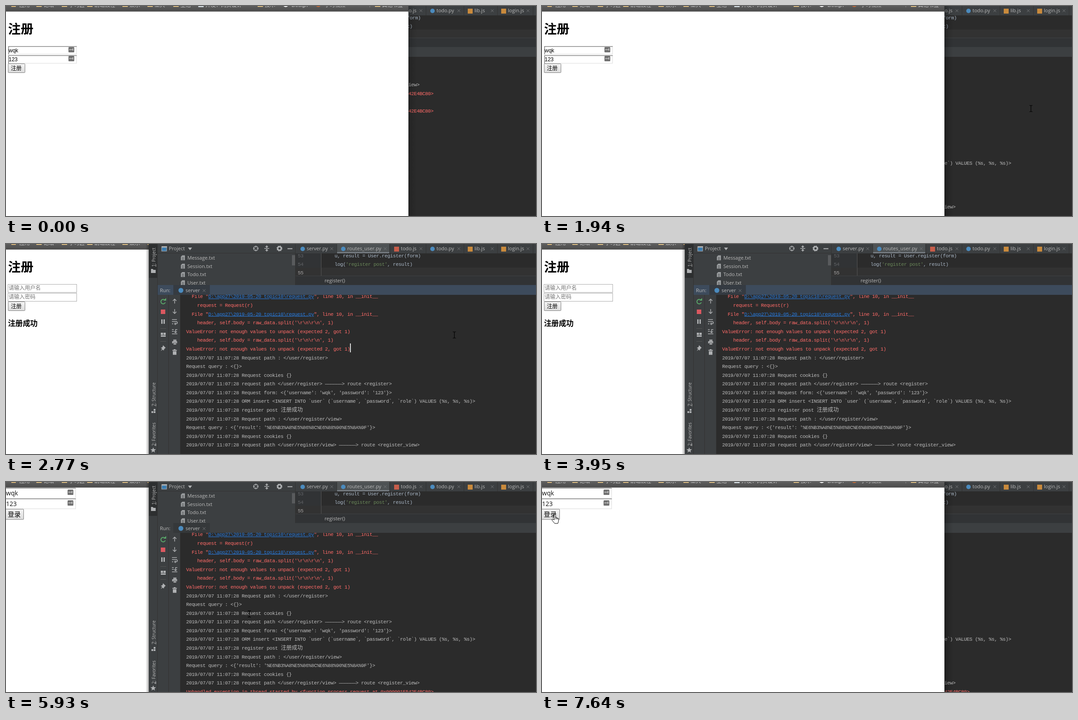
Recreate the animation shown at these times as an HTML page. Size 1188 by 471 pixels, loop 8 s.

```html
<!DOCTYPE html>
<html lang="zh">
<head>
<meta charset="utf-8">
<style>
html, body { margin: 0; width: 100%; height: 100%; overflow: hidden; background: #2b2b2b; }
svg { display: block; }
text { white-space: pre; font-family: "Open Sans", "Noto Sans CJK SC", sans-serif; }
.mono { font: 11.2px "Liberation Mono", "Noto Sans CJK SC", monospace; letter-spacing: -.486px; }
.cjk { font-family: "Liberation Sans", "Noto Sans CJK SC", sans-serif; }
.link { fill: #287bde; text-decoration: underline 1px; }
.str { fill: #6a8759; }
.u { text-decoration: underline; }
</style>
</head>
<body>
<svg id="stage" width="1188" height="471" viewBox="0 0 1188 471"></svg>
<script>
const USER = 'wqk';
const esc = s => s.replace(/&/g, '&amp;').replace(/</g, '&lt;');
const rect = (x, y, w, h, fill, more = '') =>
  `<rect x="${x}" y="${y}" width="${w}" height="${h}" fill="${fill}" ${more}/>`;
const dot = (x, y, r, fill) => `<circle cx="${x}" cy="${y}" r="${r}" fill="${fill}"/>`;
const line = (d, color = '#afb1b3', width = 1.5) =>
  `<path d="${d}" fill="none" stroke="${color}" stroke-width="${width}"/>`;
const shape = (d, fill = '#afb1b3') => `<path d="${d}" fill="${fill}"/>`;
// y is the vertical middle of the text
const text = (x, y, s, fill = '#bbb', size = 11.1, more = '') =>
  `<text x="${x}" y="${y + size * .36}" fill="${fill}" font-size="${size}" ${more}>${esc(s)}</text>`;
const cjk = (x, y, s, size, fill = '#000', more = '') => text(x, y, s, fill, size, 'class="cjk" ' + more);
const code = (x, y, s, fill = '#bbb') =>
  `<text class="mono" x="${x}" y="${y + 4}" fill="${fill}">` +
  esc(s).replace(/D:.*?py/, '<tspan class="link">$&</tspan>').replace(/'register post'/, '<tspan class="str">$&</tspan>') +
  '</text>';
const group = (id, s, more = '') => `<g id="${id}" ${more}>${s}</g>`;
const cross = (x, y) => line(`M${x - 3} ${y - 3}l6 6m0-6l-6 6`, '#77797b', 1);

// ---- console ----
const RED = '#ff6b68', stamp = '2019/07/07 11:07:28 ';
const file = '  File "D:\\app27\\2019-05-20 topic10\\request.py", line 10, in __init__';
const split = "    header, self.body = raw_data.split('\\r\\n\\r\\n', 1)";
const unpack = 'ValueError: not enough values to unpack (expected 2, got 1)';
const viewed = stamp + 'request path </user/register/view> ——————> route <register_view>';
const crash = 'Unhandled exception in thread started by <function process_request at 0x000001E542E4BC80>';
const row = (i, s, fill) => code(403.7, 117.4 + 19.59 * i, s, fill);
const errors = [file, '    request = Request(r)', file, split, unpack, split, unpack];
const logs = [
  stamp + 'Request path : </user/register>',
  'Request query : <{}>',
  stamp + 'Request cookies {}',
  stamp + 'request path </user/register> ——————> route <register>',
  stamp + `Request form: <{'username': '${USER}', 'password': '123'}>`,
  stamp + 'ORM insert <INSERT INTO `user` (`username`, `password`, `role`) VALUES (%s, %s, %s)>',
  stamp + 'register post ',
  stamp + 'Request path : </user/register/view>',
  "Request query : <{'result': '%E6%B3%A8%E5%86%8C%E6%88%90%E5%8A%9F'}>",
  stamp + 'Request cookies {}',
  viewed
];
const consoleBox = rect(391, 114, 797, 357, '#2b2b2b') + group('inner',
  group('before', row(3, viewed) + row(4, crash, RED) + row(6, crash, RED)) +
  group('after', errors.map((s, i) => row(i, s, RED)).join('') +
    logs.map((s, i) => row(i + 7, s)).join('') + cjk(616, 371.5, '注册成功', 12.3, '#bbb')) +
  group('crash', row(18, crash, RED)) +
  group('caret', rect(771, 223, 2, 20, '#ddd')), 'clip-path="url(#consoleClip)"');

// ---- editor window ----
const PY = '#4b8bbe', JS = '#c98a3c';
const tabs = [['server.py', 674, 730, PY], ['routes_user.py', 765, 850, PY], ['todo.js', 885, 930, '#c75d4a'],
  ['todo.py', 965, 1015, PY], ['lib.js', 1050, 1090, JS], ['login.js', 1125, 1170, JS]];
const tabBar = rect(649, 0, 539, 21, '#3c3f41') + rect(741, 0, 118, 21, '#4e5254') + rect(741, 18, 118, 3, '#747a80') +
  tabs.map(([name, x, end, color]) =>
    (color === PY ? dot(x - 9, 11, 5, color) : rect(x - 15, 6, 11, 11, color)) +
    text(x, 10.5, name) + cross(end, 10.5)).join('') +
  [741, 860, 941, 1026, 1101, 1181].map(x => rect(x, 0, 1, 21, '#323232')).join('');

const editor = rect(649, 20, 539, 73, '#2b2b2b') + rect(649, 20, 57, 52, '#313335') +
  rect(649, 53, 539, 18, '#323232') + rect(706, 20, 1, 52, '#555') +
  [53, 54, 55].map((n, i) => code(654, 26 + i * 19.2, '' + n, i < 2 ? '#606366' : '#a4a3a3')).join('') +
  code(736.5, 25.5, 'u, result = User.register(form)', '#a9b7c6') +
  code(736.5, 45, "log('register post', result)", '#a9b7c6') +
  rect(649, 71, 539, 22, '#313335') + rect(649, 71, 539, 1, '#3f4143') + text(714, 82, 'register()');

const tree = rect(340, 0, 309, 93, '#3c3f41') + rect(340, 20, 309, 1, '#323232') +
  rect(349, 6, 11, 10, '#3a7cb0', 'stroke="#afb1b3"') + rect(349, 5, 12, 3, '#afb1b3') +
  text(365, 10.5, 'Project') + shape('M408 8h9l-4.5 6z') +
  `<circle cx="560" cy="10" r="5" fill="none" stroke="#afb1b3" stroke-width="1.4"/>` + line('M560 4v4m0 4v4m-6-6h4m4 0h4') +
  line('M579 10h11M584.500 3v4m0 6v4', '#afb1b3', 1.6) + shape('M581 5h7l-3.500 4zM581 15h7l-3.500-4z') +
  `<circle cx="613" cy="10" r="4" fill="none" stroke="#afb1b3" stroke-width="3"/>` +
  `<circle cx="613" cy="10" r="5.500" fill="none" stroke="#afb1b3" stroke-width="2" stroke-dasharray="2.160"/>` +
  rect(631, 9.5, 11, 2, '#afb1b3') +
  ['Message', 'Session', 'Todo', 'User'].map((s, i) => {
    const y = 31 + i * 18.7;
    return shape(`M395 ${y - 5.5}h6v11h-9v-8z`, '#9da0a2') +
      line(`M394 ${y - 1}h5m-5 2.500h5m-5 2.500h5`, '#4a4d4f', 1) + text(406.5, y, s + '.txt');
  }).join('') + rect(641, 25, 7, 23, '#595b5d') + rect(648, 0, 1, 93, '#323232');

const side = (y, n, s) => `<text transform="translate(334.500 ${y}) rotate(-90)" font-size="9.900" fill="#bbb">` +
  `<tspan class="u">${n}</tspan>: ${s}</text>`;
const strip = rect(320, 0, 20, 471, '#3c3f41') + rect(320, 0, 19, 76, '#2d2f30') + rect(339, 0, 1, 471, '#323232') +
  side(51, 1, 'Project') + shape('M325 56h4l1.500 2h5v7h-10.500z') +
  side(364, 7, 'Structure') + rect(326, 375, 4, 4, '#afb1b3') + rect(331, 375, 4, 4, '#afb1b3') + rect(331, 370, 4, 4, '#afb1b3') +
  side(453, 2, 'Favorites') + shape('M330 456l1.700 4.300 4.500.200-3.500 2.900 1.300 4.400-4-2.500-4 2.500 1.300-4.400-3.500-2.900 4.500-.200z');

const runBar = rect(340, 92, 848, 22, '#3c3f41', 'id="runBar"') + rect(375, 92, 82, 22, '#323638', 'opacity=".7"') +
  text(345, 104, 'Run:') + dot(392, 104, 5.5, PY) + text(402.5, 104, 'server') + cross(444, 104.5);

const tools = rect(340, 114, 51, 357, '#3c3f41') + rect(364, 114, 1, 357, '#323232') + rect(390, 114, 1, 357, '#323232') +
  line('M356 126a5 5 0 1 0 1 5', '#59a869', 2) + shape('M353 127h6v-6z', '#59a869') +
  rect(347, 147, 10, 10, '#db5860') + rect(348, 169, 3, 10, '#afb1b3') + rect(353, 169, 3, 10, '#afb1b3') +
  rect(346, 189, 13, 1, '#555') + rect(347, 199, 5, 5, '#afb1b3') + rect(353, 199, 5, 5, '#afb1b3') + rect(347, 205, 11, 3, '#afb1b3') +
  rect(346, 218, 13, 1, '#555') + shape('M352 227l6 6-2 1-2 3v2l-3-2-4 3 3-5-3-2 4-2z') +
  line('M378 133.500v-10m-4 4l4-4 4 4M378 146v10m-4-4l4 4 4-4') +
  line('M372 169.500h11M372 174h9q3 0 3 2.500t-3 2.500h-3m2-2.500l-2 2.500 2 2.500M372 179h3') +
  rect(368, 187, 20, 20, '#55595c', 'id="follow" rx="2"') +
  line('M372 192h4m3 0h5M372 196h4m-4 5.500h12M380 193v6m-3-3l3 3 3-3') +
  rect(375, 214.500, 7, 3, '#afb1b3') + rect(372.500, 218, 11, 5, '#afb1b3') + rect(375, 222, 7, 4, '#afb1b3', 'stroke="#3c3f41"') +
  rect(373, 237.500, 10, 2, '#afb1b3') + rect(376, 236, 4, 2, '#afb1b3') + rect(374, 240.500, 8, 8, '#afb1b3');

// ---- browser window ----
const folders = [[68, '论坛'], [125, '学习区'], [182, '前端教程'], [261, '娱乐'], [317, '工具'], [375, '生活'],
  [564, '技术'], [827, '其他书签']];
const mark = (x, s) => cjk(x, -2.5, s, 11.7, '#ccc');
const bookmarks = rect(0, 0, 902, 12.5, 'url(#bar)') +
  rect(12, 0, 10, 2, '#d9b77b') + mark(30, '应用') +
  folders.map(([x, s]) => rect(x, -6, 12, 8, '#dcbd82') + mark(x + 16, s)).join('') +
  rect(431, -6, 12, 8.5, '#d5dde2') + mark(447, '开发：网页设计') +
  dot(627, -3.5, 6, '#eee') + mark(640, 'Design') + dot(700, -3.5, 6, '#b9683a') + mark(714, '学习视频') +
  rect(815, 0, 1, 3, '#888');

const field = (x, y, w, h) => rect(x, y, w, h, '#fff') +
  line(`M${x} ${y + h - .5}h${w - .5}v${-h}`, '#e6e6e6', 1.5) +
  line(`M${x + .8} ${y + h}v${.8 - h}h${w - .8}`, '#858585', 1.6);
const badge = (x, y) => rect(x, y, 13, 12, '#717171', 'rx="1.500"') +
  [2.5, 5, 7.5].map(d => rect(x + d - .5, y + 5, 1.500, 1.500, '#fff')).join('') + rect(x + 9.500, y + 3, 1, 5, '#fff');
const button = (id, x, y, w, h) => rect(x + .5, y + .5, w - 1, h - 1, 'url(#button)', `id="${id}" stroke="#7b7b7b" rx="1"`);
const thin = y => rect(4.5, y + .5, 154, 18, '#fff', 'stroke="#ababab"');

const signUp = cjk(4.5, 52, '注册', 28.5, '#000', 'font-weight="700"') +
  group('thin', thin(90) + thin(110)) +
  group('inset', field(5, 90, 153.5, 18.5) + field(5, 110.5, 153.5, 18.5) + badge(140, 92) + badge(140, 112)) +
  group('filled', cjk(6, 99.5, USER, 12) + cjk(6, 119.5, '123', 12)) +
  group('done', cjk(6, 99, '请输入用户名', 12, '#757575') + cjk(6, 119, '请输入密码', 12, '#757575') +
    cjk(4.5, 178, '注册成功', 16.6, '#000', 'font-weight="700"')) +
  button('send', 4.5, 129, 38.5, 21) + cjk(11, 139.5, '注册', 12);

const signIn = field(-3, 13, 159.5, 24) + field(-3, 37, 159.5, 23.500) + badge(138, 17) + badge(138, 41) +
  text(0, 25, USER, '#111', 14) + text(0, 48.500, '123', '#111', 14) +
  button('enter', -3, 60.5, 43, 24) + cjk(4, 73, '登录', 14.4);

const stage = document.getElementById('stage');
stage.innerHTML = `<defs>
  <clipPath id="consoleClip">${rect(391, 114, 797, 357, '#000')}</clipPath>
  <clipPath id="ideClip"><rect id="ideEdge" y="0" width="1188" height="471"/></clipPath>
  <linearGradient id="bar" x2="0" y2="1"><stop stop-color="#5d5d5d"/><stop offset="1" stop-color="#4b4b4b"/></linearGradient>
  <linearGradient id="button" x2="0" y2="1"><stop stop-color="#f6f6f6"/><stop offset="1" stop-color="#dcdcdc"/></linearGradient>
  <linearGradient id="dim"><stop stop-color="#000" stop-opacity=".3"/><stop offset=".5" stop-color="#000" stop-opacity=".1"/><stop offset="1" stop-color="#000" stop-opacity="0"/></linearGradient>
  <linearGradient id="soft"><stop stop-color="#000" stop-opacity="0"/><stop offset="1" stop-color="#000" stop-opacity=".3"/></linearGradient>
</defs>` +
  rect(0, 0, 902, 471, '#fff') + bookmarks + group('signUp', signUp) + group('signIn', signIn) +
  rect(313, 0, 7, 471, 'url(#soft)', 'id="ideShade"') +
  group('ide', editor + tabBar + tree + runBar + strip + consoleBox + tools, 'clip-path="url(#ideClip)"') +
  rect(902, 0, 20, 471, 'url(#dim)', 'id="webShade"') +
  group('arrow', '<path d="M0 0v16l3.700-3.500 2.500 5.800 2.500-1.100-2.500-5.600h5z" fill="#fff" stroke="#000"/>') +
  group('beam', line('M-3.500-7h2.500l1 1 1-1h2.500M0-6v12M-3.500 7h2.500l1-1 1 1h2.500', '#000', 1.2)) +
  group('hand', '<path d="M-1.600 12V1.200a1.600 1.600 0 0 1 3.200 0V7l5.400 1.300q1.600.500 1.500 2.400l-.700 5-1.300 4.300H-.500L-5.500 14q-2-2.600-.800-3.400 1.600-.800 2.900.400z" fill="#fff" stroke="#000"/>' +
    line('M1.600 7v4m2.500-3.400v3.400m2.300-2.800v3', '#000', .8));

const el = id => document.getElementById(id);
const show = (id, on) => el(id).setAttribute('visibility', on ? 'inherit' : 'hidden');
const between = (t, a, b) => t >= a && t < b;

// pointer path: time, x, y
const path = [[280, 908, 430], [830, 26, 131], [1550, 26, 131], [1720, 1042, 218], [1860, 1068, 224], [1940, 1096, 230],
  [2090, 1096, 230], [2610, 1005, 204], [2800, 1005, 204], [2930, 983.5, 203.5], [3630, 983.5, 203.5],
  [5780, 869, 429], [6010, 424, 246], [6250, 420, 236], [7020, 29, 73], [8000, 29, 73]];
function pointer(t) {
  const i = path.findIndex(p => p[0] > t);
  if (i < 1) return null;
  const [t0, x0, y0] = path[i - 1], [t1, x1, y1] = path[i];
  const k = (t - t0) / (t1 - t0), s = k * k * (3 - 2 * k);
  return [x0 + (x1 - x0) * s, y0 + (y1 - y0) * s];
}

function draw(t) {
  const webFront = t < 2010 || t >= 7480, login = t >= 5340, done = t >= 2770;
  const focus = between(t, 2200, 5340);
  el('ideEdge').setAttribute('x', webFront ? 902 : 320);
  show('ideShade', !webFront);
  show('webShade', webFront);
  const grow = t < 2010 ? (t - 980) / 330 : (t - 7480) / 160;
  el('webShade').setAttribute('opacity', .75 + .25 * Math.min(1, Math.max(0, grow)));

  show('signUp', !login);
  show('signIn', login);
  show('filled', !done);
  show('done', done);
  const plain = between(t, 2770, 4410);
  show('thin', plain);
  show('inset', !plain);
  el('send').setAttribute('fill', between(t, 980, 1130) ? '#d2d2d2' : 'url(#button)');
  el('enter').setAttribute('fill', between(t, 7170, 7480) ? '#e2e2e2' : 'url(#button)');

  show('before', t < 1600);
  show('after', t >= 1600);
  show('crash', login);
  show('follow', t < 2200);
  show('caret', focus && !between(t, 3630, 4100) && !between(t, 4640, 5100));
  el('runBar').setAttribute('fill', focus ? '#3d4b5c' : '#3c3f41');

  const p = between(t, 3630, 5780) ? null : pointer(t);
  let kind = '';
  if (p) {
    const onButton = login ? p[0] < 40 && p[1] < 86 : p[0] < 43 && p[1] < 150;
    kind = onButton ? 'hand' : p[0] > (webFront ? 902 : 391) ? 'beam' : 'arrow';
  }
  for (const id of ['arrow', 'beam', 'hand']) {
    show(id, id === kind);
    if (id === kind) el(id).setAttribute('transform', `translate(${p[0]} ${p[1]})`);
  }
}

const start = performance.now();
function tick() {
  draw((performance.now() - start) % 8000);
  requestAnimationFrame(tick);
}
tick();
</script>
</body>
</html>
```
